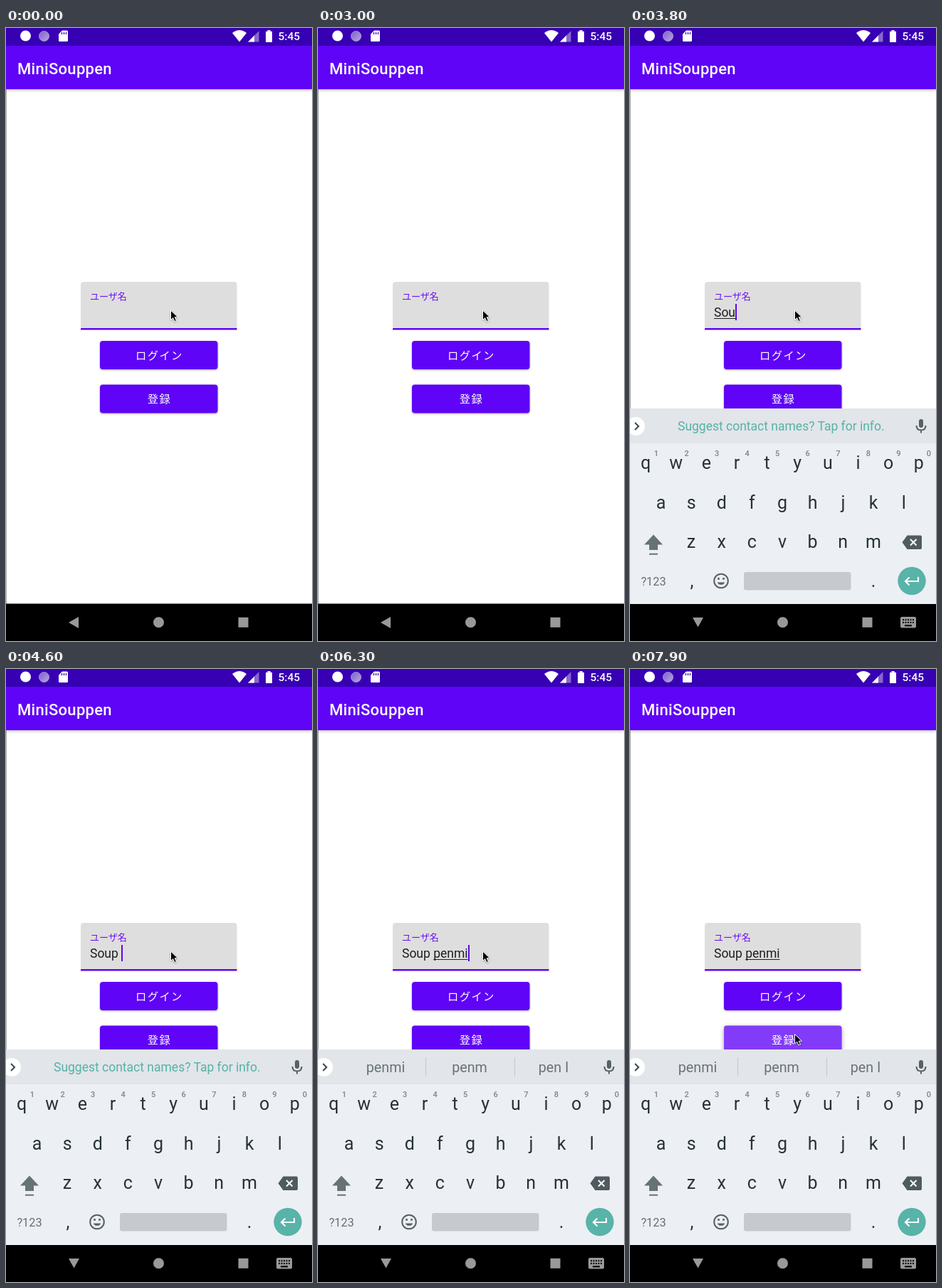
An HTML page for the animation above (8000 ms loop, 430 by 862 pixels).

```html
<!DOCTYPE html>
<html lang="ja">
<head>
<meta charset="utf-8">
<title>Login</title>
<style>
html, body { margin: 0; width: 100%; height: 100%; overflow: hidden; background: #fff; }
#stage { position: absolute; left: 0; top: 0; width: 430px; height: 862px; overflow: hidden; }
svg { position: absolute; left: 0; top: 0; font-family: Roboto, sans-serif; }
.jp { font-family: "Noto Sans CJK JP", "Noto Sans CJK", sans-serif; }
.btn { font-size: 15.3px; letter-spacing: 1.36px; fill: #fff; text-anchor: middle; }
.raised { filter: drop-shadow(0 1.5px 1.5px rgba(0, 0, 0, .32)); }
.mid { text-anchor: middle; }
.key { font-size: 25px; fill: #263238; }
.num { font-size: 11px; font-weight: 500; fill: #7b8489; }
.word { font-size: 19.7px; fill: #697378; }
#entry { position: absolute; left: 118px; top: 388px; height: 24px; white-space: pre;
  font: 17.5px/24px Roboto, sans-serif; color: #1f1f1f; }
#entry u { text-underline-offset: 2px; text-decoration-thickness: 1px; text-decoration-skip-ink: none; }
#caret { position: absolute; right: -2px; top: 0; width: 2px; height: 23px; background: #5f04f6; }
</style>
</head>
<body>
<div id="stage">
<svg width="430" height="862" viewBox="0 0 430 862">
  <defs>
    <linearGradient id="ball" x1="0" y1="0" x2="1" y2="1">
      <stop offset="0" stop-color="#7b5fc8"/><stop offset="1" stop-color="#b9a6e2"/>
    </linearGradient>
    <clipPath id="btnClip"><rect x="132" y="501.500" width="165.500" height="40" rx="4"/></clipPath>
  </defs>

  <rect width="430" height="862" fill="#fff"/>
  <rect y="86" width="1" height="724" fill="#b0b0b0"/>

  <g style="filter:drop-shadow(0 1.500px 2px rgba(0,0,0,.35))"><rect y="25" width="430" height="61" fill="#5f04f6"/></g>
  <rect width="430" height="25" fill="#3700b3"/>
  <text x="16" y="64.500" font-size="22" font-weight="500" letter-spacing=".3" fill="#fff">MiniSouppen</text>

  <g fill="#fff">
    <circle cx="27.500" cy="11" r="7.500"/>
    <circle cx="53.500" cy="11.500" r="7" fill="url(#ball)" stroke="#a796dc"/>
    <path d="M79 3.500h6.500q1.500 0 1.500 1.500v12.500q0 1.500-1.500 1.500h-10q-1.500 0-1.500-1.500V8.500z"/>
    <path d="M78.500 6v3M81.500 6v3M84.500 6v3" stroke="#3700b3" stroke-width="1.300"/>
    <path d="M328 19.500L318 7q10-8 20 0z"/>
    <path d="M355.500 4v15.500H340z" opacity=".4"/>
    <path d="M349 10.500v9h-9z"/>
    <path d="M367.500 3h4v1.800h2.500V20h-9V4.800h2.500z"/>
    <text x="382.500" y="17" font-size="15.500" font-weight="500">5:45</text>
  </g>

  <path d="M105 424V361q0-4 4-4H320.500q4 0 4 4V424z" fill="#dedede"/>
  <rect x="105" y="422" width="219.500" height="2.500" fill="#5f04f6"/>
  <text class="jp" x="118" y="382.300" font-size="13" fill="#6a14f4">ユーザ名</text>

  <rect class="raised" x="132" y="440" width="165.500" height="40" rx="4" fill="#5f04f6"/>
  <text class="jp btn" x="215.400" y="465.800">ログイン</text>
  <rect id="join" class="raised" x="132" y="501.500" width="165.500" height="40" rx="4" fill="#5f04f6"/>
  <g clip-path="url(#btnClip)" fill="#fff">
    <rect id="tint" x="132" y="501" width="166" height="41" opacity="0"/>
    <circle id="ripple" cx="231" cy="518" opacity="0"/>
  </g>
  <text class="jp btn" x="215.400" y="527.300">登録</text>

  <rect y="809.500" width="430" height="53" fill="#000"/>
  <g fill="#999">
    <path id="back" d="M88 836l14-8v16z"/>
    <circle cx="214.500" cy="835.800" r="7.500"/>
    <rect x="326.500" y="828.800" width="14" height="14"/>
    <g id="navKeys">
      <path d="M88 829h15l-7.500 13.500z"/>
      <rect x="380" y="828" width="22" height="15.500" rx="2"/>
      <path d="M383 832.300h16M383 836h16" stroke="#000" stroke-width="2" stroke-dasharray="2 1.500"/>
      <path d="M386 840.300h10" stroke="#000" stroke-width="2"/>
    </g>
  </g>

  <g id="board">
    <rect y="535" width="430" height="275" fill="#eceff3"/>
    <rect y="535" width="430" height="49" fill="#e2e5e9"/>
    <circle cx="8" cy="560" r="13" fill="#fff"/>
    <path d="M7 555l5 5-5 5" fill="none" stroke="#37474f" stroke-width="2"/>
    <text id="banner" x="67" y="566.300" font-size="17.500" fill="#55b2a8">Suggest contact names? Tap for info.</text>
    <g id="words">
      <text class="word mid" x="95" y="567"></text>
      <text class="word mid" x="213" y="567"></text>
      <text class="word mid" x="331" y="567"></text>
      <path d="M151.500 546v27M276.500 546v27" stroke="#c3c7cb"/>
    </g>
    <g fill="none" stroke="#566167" stroke-width="2">
      <rect x="406" y="550" width="6" height="12" rx="3" fill="#566167" stroke="none"/>
      <path d="M402.500 559q0 6.500 6.500 6.500t6.500-6.500M409 565.500v4"/>
    </g>
    <g id="keys"></g>
    <path d="M33 712.500l13 14h-7v7.500H27v-7.500h-7zM27 738.800h12v2H27z" fill="#677277"/>
    <path d="M389.500 713.500H408q2 0 2 2v15.500q0 2-2 2H389.500l-7-9.700z" fill="#505b61"/>
    <path d="M394 719l8.500 8.500M402.500 719l-8.500 8.500" stroke="#fff" stroke-width="2"/>
    <text class="mid" x="33" y="784" font-size="16.300" fill="#667075">?123</text>
    <g fill="none" stroke="#566167" stroke-width="2">
      <circle cx="128" cy="777.500" r="9.800"/>
      <path d="M122.800 779.500a5.500 5 0 0 0 10.400 0z" fill="#566167" stroke="none"/>
      <path d="M124.500 773v2.800M131.500 773v2.800" stroke-width="2.600"/>
    </g>
    <rect x="160" y="765" width="150.500" height="25.500" rx="3" fill="#c6c9ce"/>
    <circle cx="396" cy="777.500" r="19.700" fill="#58b3a9"/>
    <path d="M405 772v6H388M392.500 772.500l-5.500 5.500 5.500 5.500" fill="none" stroke="#fff" stroke-width="2.200"/>
  </g>
</svg>
<div id="entry"><span id="done"></span><u id="typing"></u><i id="caret"></i></div>
<svg width="430" height="862" viewBox="0 0 430 862">
  <path id="mouse" d="M0 0V13.500l3.200-2.900 2.200 5 2.500-1.100-2.200-4.800H10z" fill="#000" stroke="#fff" stroke-width="1"
    style="filter:drop-shadow(0 1px 1px rgba(0,0,0,.3))"/>
</svg>
</div>
<script>
const $ = id => document.getElementById(id);
const LOOP = 8000, STEP = 100;

// [time, finished text, word in progress, suggestions]
const typed = [
  [0, '', ''],
  [3100, '', 'S'],
  [3400, '', 'So'],
  [3700, '', 'Sou'],
  [4000, '', 'Soup'],
  [4300, 'Soup ', ''],
  [4700, 'Soup ', 'p', 'p pen put'],
  [5000, 'Soup ', 'pe', 'pe pen per'],
  [5400, 'Soup ', 'pen', 'pen pens penned'],
  [5700, 'Soup ', 'penm', 'penm pen pens'],
  [6000, 'Soup ', 'penmi', 'penmi penm pen\u00a0I']
];

const label = (cls, x, y, s) => `<text class="${cls} mid" x="${x}" y="${y}">${s}</text>`;
const row = (chars, x, y) => [...chars].map((c, i) => label('key', x + i * 42.65, y, c)).join('');
$('keys').innerHTML =
  row('qwertyuiop', 22, 620) + row('asdfghjkl', 43.5, 675.5) + row('zxcvbnm', 86, 731) +
  label('key', 87, 786, ',') + label('key', 342, 786, '.') +
  [...'1234567890'].map((c, i) => label('num', 37 + i * 42.55, 602, c)).join('');

const clamp = v => Math.min(1, Math.max(0, v));
const part = (t, from, to) => clamp((t - from) / (to - from));
const ease = p => p * p * (3 - 2 * p);
const show = (el, on) => { el.style.visibility = on ? 'visible' : 'hidden'; };

function caretOn(t) {
  if (t < 3100) return t % 1000 >= 100 && t % 1000 < 500;
  return t < 6500 || (t >= 7000 && t < 7500);
}

function draw(t) {
  const [, done, word, hints] = typed.filter(s => s[0] <= t).pop();
  $('done').textContent = done;
  $('typing').textContent = word;
  show($('caret'), caretOn(t));

  const open = t >= 3100;
  const rise = part(t, 3100, 3300);
  show($('board'), open);
  show($('navKeys'), open);
  show($('back'), !open);
  $('board').setAttribute('transform', `translate(0 ${9 * (1 - rise) ** 2})`);
  $('board').setAttribute('opacity', 0.83 + 0.17 * rise);

  $('banner').style.display = hints ? 'none' : '';
  $('words').style.display = hints ? '' : 'none';
  if (hints) hints.split(' ').forEach((w, i) => { $('words').children[i].textContent = w; });

  const y = 397 + 116.5 * ease(part(t, 6600, 7100));
  $('mouse').setAttribute('transform', `translate(231.5 ${y})`);

  const press = part(t, 7500, 7900);
  $('tint').setAttribute('opacity', 0.12 * press);
  $('ripple').setAttribute('r', 20 + 95 * press);
  $('ripple').setAttribute('opacity', 0.11 * clamp(press * 3));
  $('join').style.filter = press
    ? `drop-shadow(0 ${1.5 + press}px ${1.5 + 1.5 * press}px rgba(0,0,0,.35))` : '';
}

function tick() {
  const t = performance.now() % LOOP;
  draw(Math.floor(t / STEP) * STEP);
  requestAnimationFrame(tick);
}
tick();
</script>
</body>
</html>
```
